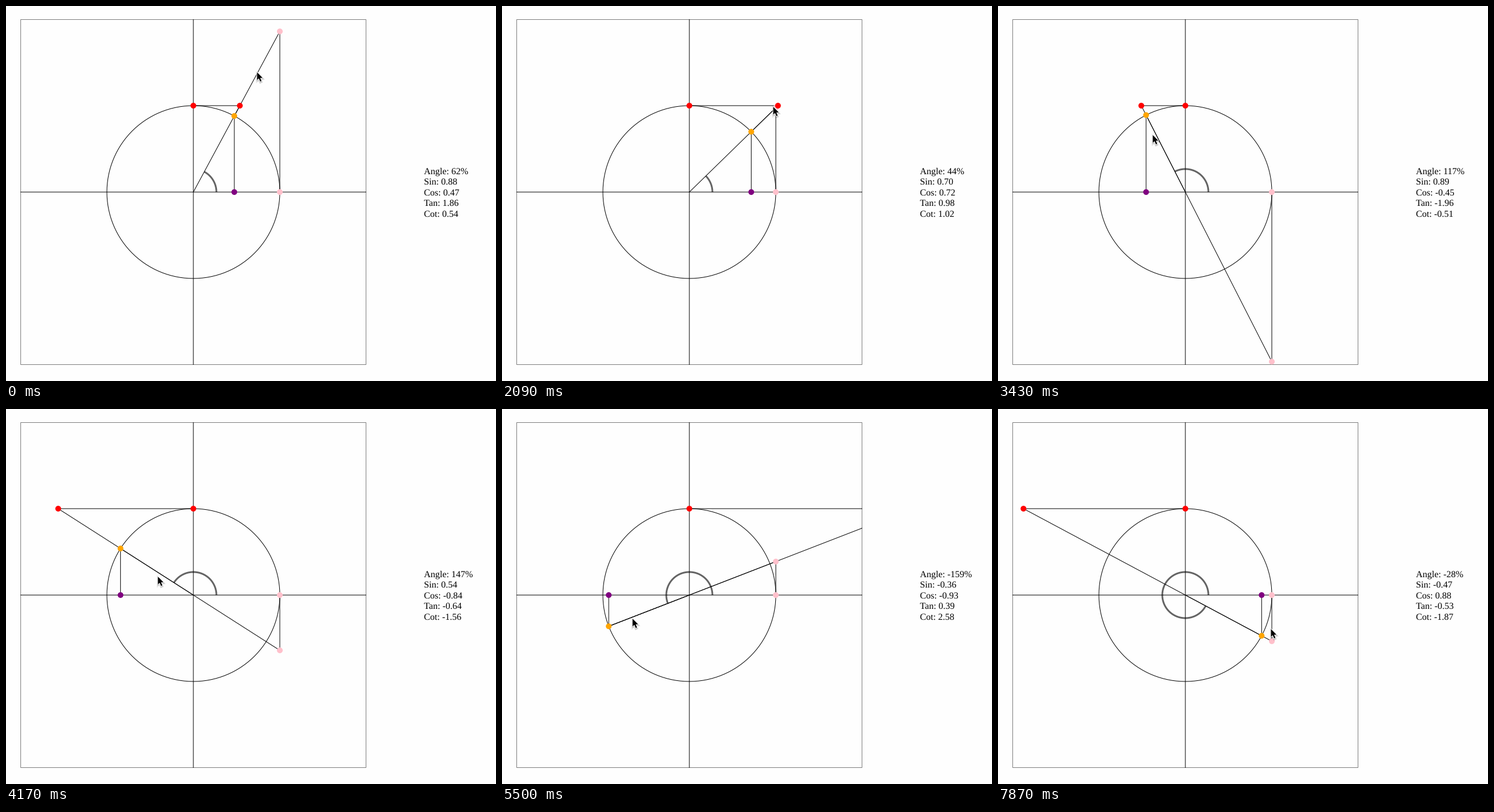
A matplotlib script that plays this animation: 850 px wide and 651 px high, repeating every 8000 ms.

```python
import numpy as np
import matplotlib.pyplot as plt
from matplotlib.animation import FuncAnimation
from matplotlib.patches import Circle, Polygon, Rectangle

WIDTH, HEIGHT, DPI = 850, 651, 100
PX = 72 / DPI
LEFT, TOP, SIDE = 25, 23, 600
CX, CY, R = 325, 323, 150
INTERVAL, DURATION = 20, 8000

# The picture advances in uneven steps of about 148 ms.
holds = np.full(52, 150)
holds[0] = 290
holds[[18, 22, 28, 32, 37, 46, 50]] = 140
starts = np.concatenate([[0], np.cumsum(holds)])

# step, unwrapped angle in degrees, pointer x, pointer y
PATH = np.array([
    (0, 61.73, 435, 114),
    (7, 40.71, 490, 189),
    (10, 33.5, 503, 209),
    (12, 38, 490, 190),
    (14, 50.6, 450, 158),
    (18, 92.57, 310, 169),
    (22, 117, 268, 223),
    (25, 139.4, 262, 273),
    (26, 139.4, 262, 273),
    (27, 147.39, 263, 290),
    (34, 191.4, 210, 353),
    (36, 201.19, 226, 363),
    (42, 238.8, 245, 440),
    (43, 239.5, 211, 505),
    (44, 244.42, 231, 519),
    (47, 267, 328, 548),
    (50, 306.2, 465, 500),
    (52, 331.89, 473, 381),
])

plt.rcParams["font.family"] = "Liberation Serif"
plt.rcParams["text.hinting"] = "none"
plt.rcParams["path.snap"] = False

fig = plt.figure(figsize=(WIDTH / DPI, HEIGHT / DPI), dpi=DPI, facecolor="#fefefe")
ax = fig.add_axes([0, 0, 1, 1])
ax.set_xlim(0, WIDTH)
ax.set_ylim(HEIGHT, 0)
ax.axis("off")
canvas = Rectangle((LEFT, TOP), SIDE, SIDE, transform=ax.transData)


def stroke(xs=(), ys=(), color="black", width=1, z=2):
    line, = ax.plot(xs, ys, color=color, lw=width * PX, zorder=z,
                    solid_capstyle="butt")
    line.set_clip_path(canvas)
    return line


def dot(color, z, x=0, y=0):
    patch = ax.add_patch(Circle((x, y), 5, color=color, lw=0, zorder=z))
    patch.set_clip_path(canvas)
    return patch


def connect(line, a, b):
    line.set_data((a[0], b[0]), (a[1], b[1]))


ax.add_patch(Rectangle((LEFT + 0.5, TOP + 0.5), SIDE - 1, SIDE - 1, fill=False,
                       ec="#7c7c7c", lw=PX, zorder=1))
stroke((LEFT, LEFT + SIDE), (CY, CY))
stroke((CX, CX), (TOP, TOP + SIDE))
turn = np.linspace(0, 2 * np.pi, 241)
stroke(CX + R * np.cos(turn), CY + R * np.sin(turn))

arc = stroke(color="#646464", width=3, z=1.5)
radius, sine, tan_ray, cot_ray, tan_side, cot_side = [stroke() for _ in range(6)]

orange = dot("orange", 4)
purple = dot("purple", 4)
tan_base, cot_base = (CX + R, CY), (CX, CY - R)
dot("pink", 5, *tan_base)
dot("red", 5, *cot_base)
pink = dot("pink", 5)
red = dot("red", 5)

labels = [ax.text(725, 291.7 + 18.5 * i, "", fontsize=16 * PX, va="baseline")
          for i in range(5)]

ARROW = np.array([(0, 0), (0, 13.6), (3.1, 10.7), (5.5, 16.2), (7.8, 15.2),
                  (5.4, 9.9), (9.6, 9.7)]) + (0.5, 1)
pointer = []
for drop, color, edge, alpha in ((1.8, "black", 3.5, 0.10), (1.2, "black", 2.5, 0.13),
                                 (0, "white", 2, 1), (0, "black", 0, 1)):
    patch = ax.add_patch(Polygon(ARROW, fc=color, ec=color, lw=edge * PX,
                                 alpha=alpha, zorder=9))
    pointer.append((patch, drop))


def update(frame):
    time = frame * INTERVAL + INTERVAL / 2
    step = np.searchsorted(starts, time, side="right") - 1
    degrees, mx, my = [np.interp(step, PATH[:, 0], PATH[:, k]) for k in (1, 2, 3)]
    angle = np.radians(degrees)
    sin, cos = np.sin(angle), np.cos(angle)
    tan, cot = sin / cos, cos / sin

    tip = CX + R * cos, CY - R * sin
    foot = tip[0], CY
    tan_end = CX + R, CY - R * tan
    cot_end = CX + R * cot, CY - R

    connect(radius, (CX, CY), tip)
    connect(sine, tip, foot)
    connect(tan_ray, tip, tan_end)
    connect(cot_ray, tip, cot_end)
    connect(tan_side, tan_base, tan_end)
    connect(cot_side, cot_base, cot_end)
    sweep = np.linspace(0, angle, 100)
    arc.set_data(CX + 40 * np.cos(sweep), CY - 40 * np.sin(sweep))

    for patch, place in ((orange, tip), (purple, foot), (pink, tan_end), (red, cot_end)):
        patch.center = place

    signed = (degrees + 180) % 360 - 180
    labels[0].set_text(f"Angle: {signed:.0f}%")
    for label, name, value in zip(labels[1:], ("Sin", "Cos", "Tan", "Cot"),
                                  (sin, cos, tan, cot)):
        label.set_text(f"{name}: {value:.2f}")

    for patch, drop in pointer:
        patch.set_xy(ARROW + (mx, my + drop))
    return []


anim = FuncAnimation(fig, update, frames=DURATION // INTERVAL, interval=INTERVAL,
                     init_func=lambda: update(0), repeat=True, repeat_delay=0)
plt.show()
```
